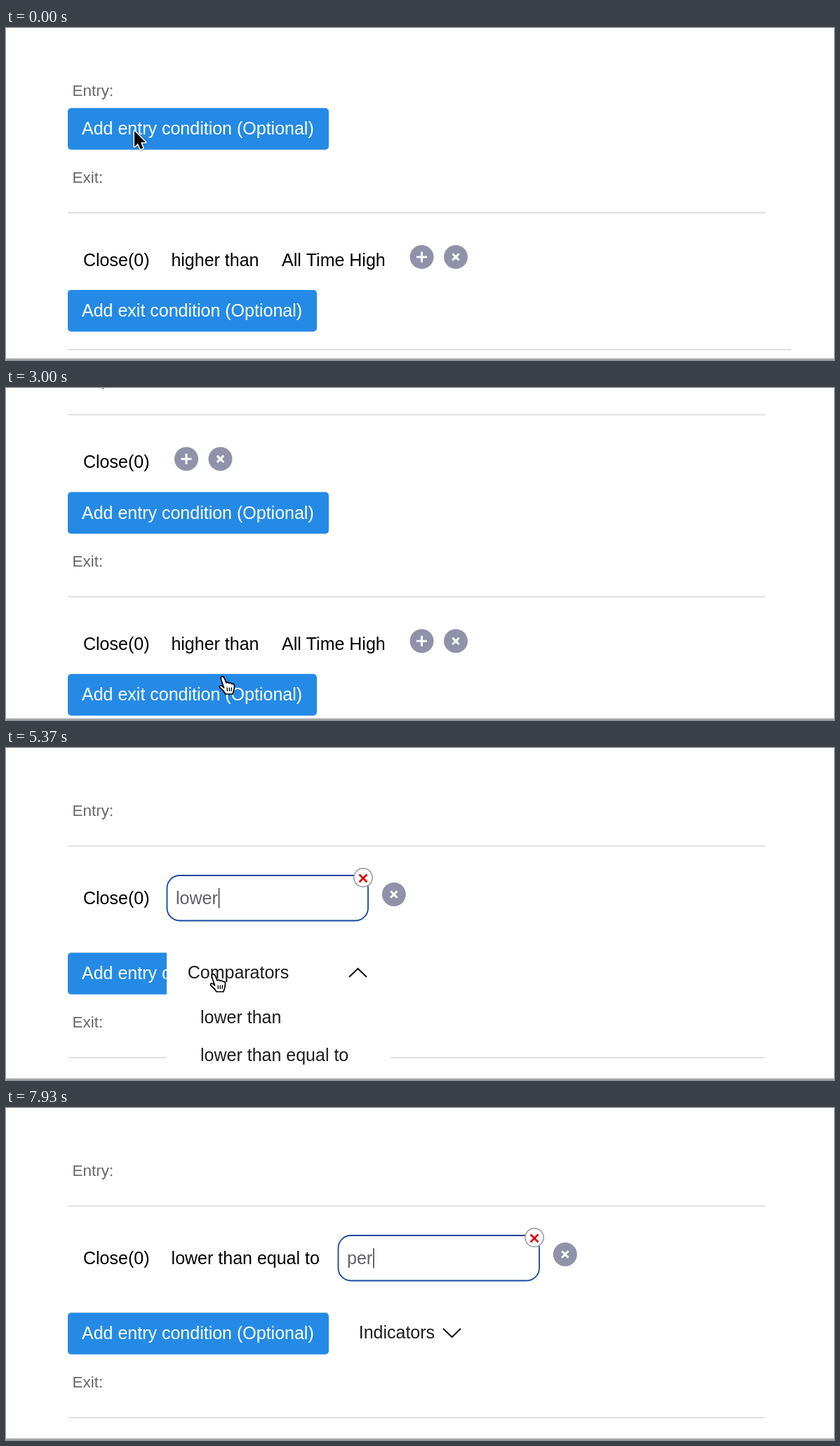
An HTML page with a canvas for the animation above (8 s loop, 1180 px wide and 474 px high).

```html
<!DOCTYPE html>
<html lang="en">
<head>
<meta charset="utf-8">
<title>Condition builder</title>
<style>
  html, body { margin: 0; width: 100%; height: 100%; overflow: hidden; background: #fff; }
  canvas { display: block; }
</style>
</head>
<body>
<canvas id="stage" width="1180" height="474"></canvas>
<script>
const ctx = document.getElementById('stage').getContext('2d');
const LOOP = 8000;
const FONT = '"Liberation Sans", Arial, sans-serif';
const PLACEHOLDER = 'Add Indicators, Comparators';

const CLOSE = [110, 'Close(0)'];
const LOWER = [235.6, 'lower than equal to'];
const EXIT_CHIPS = [CLOSE, [235.4, 'higher than'], [393, 'All Time High']];

// Entry section: empty, a finished row (plus = icon centre) or an open input
const phases = [
  { start: 0 },
  { start: 420, chips: [], input: 103.5, text: 'close', typeAt: 900, step: 85, filterAt: 985,
    item: 'Indicators', width: 201.5, expandAt: 1550, options: ['Close'] },
  { start: 1760, chips: [CLOSE], plus: 257 },
  { start: 3600, chips: [CLOSE], input: 229, text: 'lower', typeAt: 4600, step: 85, filterAt: 4770,
    item: 'Comparators', width: 319, expandAt: 5300, options: ['lower than', 'lower than equal to'] },
  { start: 5900, chips: [CLOSE, LOWER], plus: 500 },
  { start: 6560, chips: [CLOSE, LOWER], input: 473, text: 'per', typeAt: 7500, step: 170, filterAt: 7670,
    item: 'Indicators', width: 209, expandAt: Infinity, options: [] },
];

const scrollKeys = [[0, 0], [2270, 0], [2430, -70], [2570, -70], [2800, -145],
  [3000, -102], [3330, 1.6], [3380, 0], [LOOP, 0]];

// time, x, y, shape
const cursorKeys = [
  [0, 183, 147, arrow], [60, 183, 147, hand], [420, 183, 147, arrow], [800, 190, 200, null],
  [1250, 122, 300, hand], [1330, 119, 333, hand], [1480, 146, 322, hand], [1560, 146, 322, hand],
  [1670, 150, 385, hand], [1780, 150, 385, arrow], [2000, 303, 411, arrow], [2880, 303, 411, hand],
  [3010, 303, 411, hand], [3330, 246, 185, hand], [3600, 246, 187, null],
  [5080, 290, 262, hand], [5250, 290, 322, hand], [5400, 290, 322, hand], [5720, 330, 438, hand],
  [5900, 330, 438, arrow], [6130, 479, 243, arrow], [6330, 492, 196, hand], [6560, 494, 197, null],
  [LOOP, 494, 197, null],
];

function between(keys, t) {
  const i = Math.max(1, keys.findIndex(k => k[0] > t));
  const a = keys[i - 1], b = keys[i], p = (t - a[0]) / (b[0] - a[0]);
  return { from: a, mix: n => a[n] + (b[n] - a[n]) * p };
}

function label(str, x, y, color = '#000', size = 25) {
  ctx.font = `${size}px ${FONT}`;
  ctx.fillStyle = color;
  ctx.fillText(str, x, y);
}

function box(x, y, w, h, color, r = 0) {
  ctx.fillStyle = color;
  ctx.beginPath();
  ctx.roundRect(x, y, w, h, r);
  ctx.fill();
}

function stroke(d, color, width) {
  ctx.strokeStyle = color;
  ctx.lineWidth = width;
  ctx.stroke(new Path2D(d));
}

function rule(y, right = 1082) {
  box(88, y - 0.8, right - 88, 1.6, '#d8d8d8');
}

function at(x, y, draw) {
  ctx.save();
  ctx.translate(x, y);
  draw();
  ctx.restore();
}

function icon(x, y, glyph) {
  at(x, y, () => {
    box(-17, -17, 34, 34, '#8f92a9', 17);
    stroke(glyph, '#fff', 3);
  });
}
const plusIcon = (x, y) => icon(x, y, 'M-7.5 0H7.5M0-7.5V7.5');
const crossIcon = (x, y) => icon(x, y, 'M-4.7-4.7L4.7 4.7M4.7-4.7L-4.7 4.7');

function button(str, y, width) {
  box(88, y, width, 59.5, '#248ae6', 5);
  label(str, 108, y + 38, '#fff');
}

function chipText(chips, y) {
  for (const [x, str] of chips) label(str, x, y);
}

function row(chips, plus, lineY) {
  chipText(chips, lineY + 76);
  plusIcon(plus, lineY + 63);
  crossIcon(plus + 48.5, lineY + 63);
}

function inputField(phase, t) {
  const x = phase.input;
  const typed = phase.text.slice(0, Math.max(0, Math.floor((t - phase.typeAt) / phase.step) + 1));
  chipText(phase.chips, 222.5);
  ctx.beginPath();
  ctx.roundRect(x + 0.5, 182, 286.5, 64.5, 18);
  ctx.strokeStyle = '#1446a0';
  ctx.lineWidth = 1.8;
  ctx.stroke();

  ctx.save();
  ctx.beginPath();
  ctx.rect(x + 12, 190, 262, 50);
  ctx.clip();
  label(typed || PLACEHOLDER, x + (typed ? 13 : 14.5), 222.5, typed ? '#606068' : '#757575');
  if (typed) box(x + 14 + ctx.measureText(typed).width, 200, 1.6, 28.5, '#444');
  ctx.restore();

  at(x + 280, 185, () => {
    ctx.beginPath();
    ctx.arc(0, 0, 13.2, 0, 7);
    ctx.fillStyle = '#fff';
    ctx.fill();
    ctx.strokeStyle = '#9496a4';
    ctx.lineWidth = 1.5;
    ctx.stroke();
    stroke('M-5.5-4.5L5.5 6.5M5.5-4.5L-5.5 6.5', '#d80a0a', 2.8);
  });
  crossIcon(x + 323.8, 209);
}

function dropdown(phase, t) {
  const x = phase.input, open = t >= phase.expandAt, filtered = t >= phase.filterAt;
  const items = filtered ? [phase.item] : ['Indicators', 'Comparators'];
  const narrow = phase.item === 'Comparators' && !open ? 242 : phase.width;
  const width = filtered ? narrow : 442.5;
  const options = open ? phase.options : [];
  box(x, 277, width, filtered ? 87 + options.length * 54 : 197, '#fff');
  items.forEach((item, i) => at(x, 329 + i * 88, () => {
    label(item, 29.7, 0, '#1c1c1c');
    const up = open ? 'l12.5-12l12.5 12' : 'l12.5 12l12.5-12';
    stroke(`M${width - 59} ${open ? -2 : -14}${up}`, '#111', 2);
  }));
  options.forEach((str, i) => label(str, x + 48, 393 + i * 54, '#1c1c1c'));
}

function arrow() {
  const path = new Path2D('M0 0V22.5L5 17.8L8.6 26L12.4 24.4L9 16.3H16Z');
  ctx.lineJoin = 'round';
  ctx.strokeStyle = '#fff';
  ctx.lineWidth = 3;
  ctx.shadowColor = 'rgba(0,0,0,.4)';
  ctx.shadowBlur = 3;
  ctx.shadowOffsetY = 1;
  ctx.stroke(path);
  ctx.shadowColor = 'transparent';
  ctx.fillStyle = '#000';
  ctx.fill(path);
}

function hand() {
  const path = new Path2D('M7.5 17L3.5 5Q2.5 1.5 5 1Q7.5 .7 8.5 4L11 10Q13 8 15 10.5' +
    'Q17.5 9 18.8 11.5Q22.5 10.5 22.5 14.5Q22.5 20 20 26H10Q7 21 2 17Q.5 14.5 3 14Q5 14 7.5 17Z');
  ctx.lineJoin = 'round';
  ctx.fillStyle = '#fff';
  ctx.fill(path);
  ctx.strokeStyle = '#000';
  ctx.lineWidth = 1.7;
  ctx.stroke(path);
  stroke('M12 16.5L12.5 22M15.3 16.5V22M18.5 16.5L18 22', '#000', 1.3);
}

function render(t) {
  const phase = phases.findLast(p => t >= p.start);
  const buttonY = phase.input ? 292.3 : phase.plus ? 250.3 : 114.2;
  const exitLine = buttonY + 149.7;
  box(0, 0, 1180, 474, '#fff');

  at(0, between(scrollKeys, t).mix(1), () => {
    label('Entry:', 94.5, 97.3, '#666', 22.5);
    if (phase.chips) rule(140);
    if (phase.plus) row(phase.chips, phase.plus, 140);
    if (phase.input) inputField(phase, t);

    button('Add entry condition (Optional)', buttonY, 372);
    label('Exit:', 94.5, buttonY + 106.8, '#666', 22.5);
    rule(exitLine);
    row(EXIT_CHIPS, 592.5, exitLine);
    button('Add exit condition (Optional)', exitLine + 110, 355);
    rule(exitLine + 195.3, 1119);
    if (phase.input) dropdown(phase, t);
  });

  const cursor = between(cursorKeys, t);
  if (cursor.from[3]) at(cursor.mix(1), cursor.mix(2), cursor.from[3]);
  box(0, 472, 1180, 1.6, '#808080');
}

function tick() {
  render(performance.now() % LOOP);
  requestAnimationFrame(tick);
}
tick();
</script>
</body>
</html>
```
